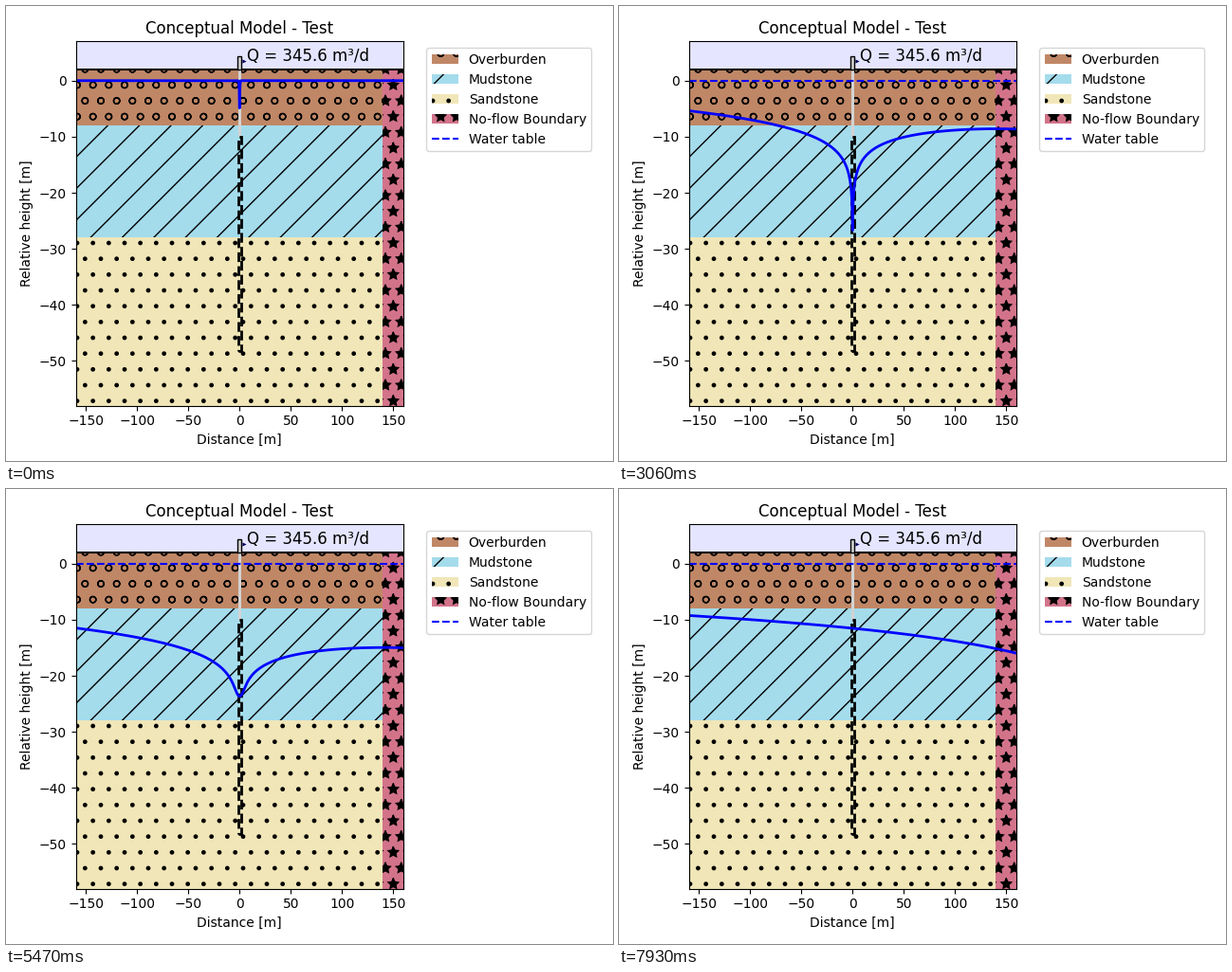
A matplotlib script that plays this animation: 640x480 px, repeating every 7990 ms.

```python
import numpy as np
import matplotlib.pyplot as plt
from matplotlib.animation import FuncAnimation
from matplotlib.patches import Rectangle

FRAMES, INTERVAL = 235, 34
STEP_MS, LAST_PUMP, RECOVERY_MS = 60, 83, 5110

Q, T = 345.6, 20.0                  # m3/d, m2/d
SCALE = Q / (4 * np.pi * T)
WELL_R, IMAGE_X = 0.1, 280

# log of 4Tt/S against animation step; interpolated on a saturating axis
KNOT_STEP = np.array([0, 7, 34, 51, 74, 83])
KNOT_LOG = np.array([-0.5, 3.22, 11.45, 13.56, 15.44, 15.9])


def warp(step):
    return 1 - np.exp(-np.asarray(step) / 27)


def log_time(step):
    return np.interp(warp(step), warp(KNOT_STEP), KNOT_LOG)


def well_function(u):
    """Exponential integral E1(u), rational approximations."""
    lo, hi = np.minimum(u, 1), np.clip(u, 1, 500)
    small = -np.log(lo) + np.polyval(
        [0.00107857, -0.00976004, 0.05519968, -0.24991055, 0.99999193, -0.57721566], lo)
    num = np.polyval([1, 8.5733287401, 18.0590169730, 8.6347608925, 0.2677737343], hi)
    den = np.polyval([1, 9.5733223454, 25.6329561486, 21.0996530827, 3.9584969228], hi)
    return np.where(u <= 1, small, np.exp(-hi) / hi * num / den)


side = np.geomspace(WELL_R, 160, 220)
x = np.concatenate([-side[::-1], side])
r_well, r_image = np.abs(x), np.abs(IMAGE_X - x)


def theis(r, log_b):
    return SCALE * well_function(r ** 2 / np.exp(log_b))


def head(step):
    if step <= LAST_PUMP:
        b = log_time(step)
        return -theis(r_well, b) - theis(r_image, b)
    rest = log_time(step - LAST_PUMP)
    b = np.logaddexp(KNOT_LOG[-1], rest)
    drawdown = theis(r_well, b) + theis(r_image, b)
    return -(drawdown - theis(r_well, rest) + theis(r_image, rest))


fig, ax = plt.subplots(figsize=(6.4, 4.8), dpi=100)
ax.set_xlim(-160, 160)
ax.set_ylim(-58, 7)


def block(x0, x1, y0, y1, color, **kw):
    ax.add_patch(Rectangle((x0, y0), x1 - x0, y1 - y0, facecolor=color, **kw))


block(-160, 160, 2, 7, "#e5e5ff")
block(-160, 140, -8, 2, "#c08766", hatch="o", label="Overburden")
block(-160, 140, -28, -8, "#a4dcec", hatch="/", label="Mudstone")
block(-160, 140, -58, -28, "#f0e6b8", hatch=".", label="Sandstone")
block(140, 160, -58, 2, "#d3738a", hatch="*", label="No-flow Boundary")

# Well: casing, screen and head works
block(-1.5, 1.5, -10, 2, "lightgray")
block(-1.5, 1.5, -48.3, -10, "none", edgecolor="black", linestyle="--", linewidth=2)
block(-2, 2, 2, 4.4, "lightgray", edgecolor="black", zorder=3)

ax.plot([-160, 160], [2, 2], color="black", lw=1.5)
ax.plot([-160, 160], [0, 0], color="blue", ls="--", lw=1.5, label="Water table")
curve, = ax.plot(x, head(0), color="blue", lw=2)
ax.plot([4.2], [3.5], ">", color="#000060", ms=3, mew=0)
ax.text(7, 3.5, "Q = 345.6 m³/d", fontsize=12)

ax.set_title("Conceptual Model - Test")
ax.set_xlabel("Distance [m]")
ax.set_ylabel("Relative height [m]")
ax.legend(loc="upper left", bbox_to_anchor=(1.05, 1))
fig.tight_layout()


def update(i):
    t = (i + 0.5) * INTERVAL
    if t < RECOVERY_MS:
        step = min(int(t // STEP_MS), LAST_PUMP)
    else:
        step = LAST_PUMP + 1 + int((t - RECOVERY_MS) // STEP_MS)
    curve.set_ydata(head(step))
    return curve,


anim = FuncAnimation(fig, update, frames=FRAMES, interval=INTERVAL,
                     repeat=True, repeat_delay=0)
plt.show()
```
